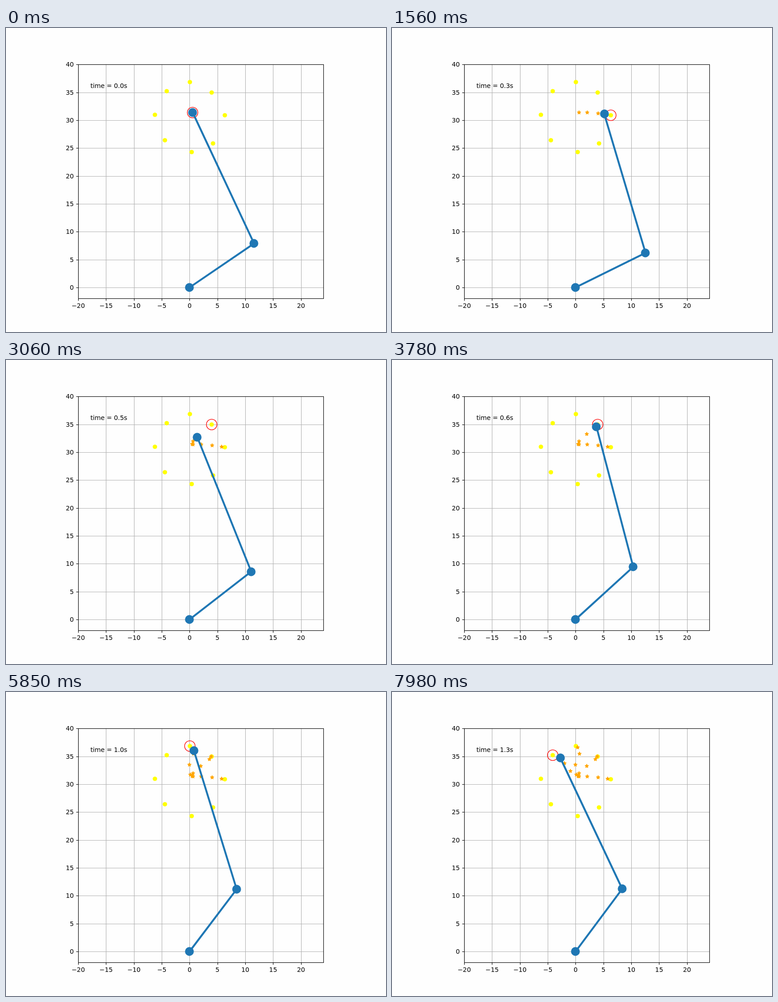
These frames come from a looping animation (837 px wide and 669 px high, 8 s). An HTML page with a canvas:

```html
<!DOCTYPE html>
<html>
<head>
<meta charset="utf-8">
<style>
html, body { margin: 0; width: 100%; height: 100%; overflow: hidden; background: #fefefe; }
canvas { display: block; }
</style>
</head>
<body>
<canvas id="stage" width="837" height="669"></canvas>
<script>
const ctx = document.getElementById('stage').getContext('2d');
const UNIT = 12.265, X0 = 404.43, Y0 = 570.88;
const LEFT = 159.5, RIGHT = 699.5, TOP = 80.5, BOTTOM = 595.5;
const UPPER = 14 * UNIT, FORE = 26 * UNIT;
const LOOP = 8000, STEP = 30, HOLD = 5, MOVE = 66, TRIAL = HOLD + MOVE;

// Reach targets in pixels; the first four are visited in turn.
const targets = [
  [481.5, 192], [453, 142], [405.3, 119.4], [354, 139],
  [328, 191.3], [350, 247.4], [408.7, 272.5], [456, 254]
];

// Hand path of each reach: [step, x, y]
const paths = [
  [[0, 411, 185.5], [8, 411.7, 185.5], [23, 430, 186.4], [27, 436.5, 186.5],
   [38, 453.5, 187.5], [53, 475.3, 190.5], [65, 481.3, 192]],
  [[0, 410.2, 185.3], [2, 410.4, 185.3], [17, 412, 179], [32, 429, 163],
   [47, 448.3, 148], [50, 450.3, 146.8], [62, 452.3, 142.2], [65, 452.6, 142]],
  [[0, 410.4, 185.4], [11, 406.3, 182], [26, 404, 160], [41, 413, 136],
   [48, 414, 129.3], [56, 409, 121.6], [65, 406, 119.5]],
  [[0, 410.6, 185.4], [5, 409.8, 185], [19, 394, 174.4], [20, 392.7, 173.6],
   [35, 380.2, 156.6], [48, 370.7, 145], [65, 355, 139.5]]
];

// Cubic Hermite curve through the path, at rest at both ends.
function handAt(path, step) {
  const last = path.length - 1;
  if (step <= 0) return path[0].slice(1);
  if (step >= path[last][0]) return path[last].slice(1);
  let k = 0;
  while (path[k + 1][0] <= step) k++;
  const a = path[k], b = path[k + 1], h = b[0] - a[0], u = (step - a[0]) / h;
  const slope = (n, c) => n === 0 || n === last ? 0 :
    (path[n + 1][c] - path[n - 1][c]) / (path[n + 1][0] - path[n - 1][0]);
  const s = u * u * (3 - 2 * u);
  return [1, 2].map(c => a[c] + (b[c] - a[c]) * s
    + h * u * (1 - u) * ((1 - u) * slope(k, c) - u * slope(k + 1, c)));
}

function elbowFor([x, y]) {
  const dx = x - X0, dy = Y0 - y, r = Math.hypot(dx, dy);
  const bend = Math.acos((r * r + UPPER ** 2 - FORE ** 2) / (2 * UPPER * r));
  const angle = Math.atan2(dy, dx) - bend;
  return [X0 + UPPER * Math.cos(angle), Y0 - UPPER * Math.sin(angle)];
}

function line(points, color, width) {
  ctx.strokeStyle = color;
  ctx.lineWidth = width;
  ctx.beginPath();
  points.forEach(([x, y]) => ctx.lineTo(x, y));
  ctx.stroke();
}

function disc([x, y], r, color) {
  ctx.fillStyle = color;
  ctx.beginPath();
  ctx.arc(Math.round(x), Math.round(y), r, 0, 7);
  ctx.fill();
}

function ring([x, y]) {
  ctx.strokeStyle = '#f00';
  ctx.lineWidth = 1.39;
  ctx.beginPath();
  ctx.arc(Math.round(x), Math.round(y), 11.6, 0, 7);
  ctx.stroke();
}

function star([x, y]) {
  ctx.fillStyle = ctx.strokeStyle = '#ffa500';
  ctx.lineWidth = 1.39;
  ctx.beginPath();
  for (let n = 0; n < 10; n++) {
    const r = n % 2 ? 1.59 : 4.17, a = n * Math.PI / 5;
    ctx.lineTo(Math.round(x) + r * Math.sin(a), Math.round(y) - r * Math.cos(a));
  }
  ctx.closePath();
  ctx.fill();
  ctx.stroke();
}

function text(str, x, y, align) {
  ctx.fillStyle = '#000';
  ctx.textAlign = align;
  ctx.fillText(str, x, y);
}

const snap = v => Math.floor(v + 0.5) + 0.5;
const label = v => String(v).replace('-', '\u2212');

function drawAxes() {
  for (let v = -20; v <= 20; v += 5) {
    const x = snap(X0 + v * UNIT);
    line([[x, TOP], [x, BOTTOM]], '#b0b0b0', 1.11);
    line([[x, BOTTOM], [x, BOTTOM + 4.86]], '#000', 1.11);
    text(label(v), X0 + v * UNIT, 616, 'center');
  }
  for (let v = 0; v <= 40; v += 5) {
    const y = snap(Y0 - v * UNIT);
    line([[LEFT, y], [RIGHT, y]], '#b0b0b0', 1.11);
    line([[LEFT - 4.86, y], [LEFT, y]], '#000', 1.11);
    text(label(v), 149.4, Math.round(y + 4.6), 'right');
  }
}

function draw(ms) {
  const tick = Math.floor(ms / STEP);
  const trial = Math.floor(tick / TRIAL), step = tick % TRIAL - HOLD;
  ctx.fillStyle = '#fefefe';
  ctx.fillRect(0, 0, 837, 669);
  ctx.font = '13.89px "DejaVu Sans", sans-serif';
  ctx.lineJoin = 'bevel';
  drawAxes();

  targets.forEach(p => disc(p, 4.86, '#ff0'));
  const hand = handAt(paths[trial], step);
  ring(step < 0 ? hand : targets[trial]);

  // A star is left behind on every 15th moving step.
  for (let n = 8; n <= trial * MOVE + step; n += 15) {
    const past = Math.floor(n / MOVE);
    if (past <= trial) star(handAt(paths[past], n % MOVE));
  }

  const arm = [[X0, Y0], elbowFor(hand), hand];
  ctx.lineJoin = 'round';
  line(arm, '#1f77b4', 4.17);
  arm.forEach(p => disc(p, 9.72, '#1f77b4'));

  ctx.strokeStyle = '#000';
  ctx.lineWidth = 1.11;
  ctx.lineJoin = 'miter';
  ctx.strokeRect(LEFT, TOP, RIGHT - LEFT, BOTTOM - TOP);
  text('time = ' + (tick * 0.005).toFixed(1) + 's', 186, 132, 'left');
}

const start = performance.now();
function loop() {
  draw((performance.now() - start) % LOOP);
  requestAnimationFrame(loop);
}
loop();
</script>
</body>
</html>
```
